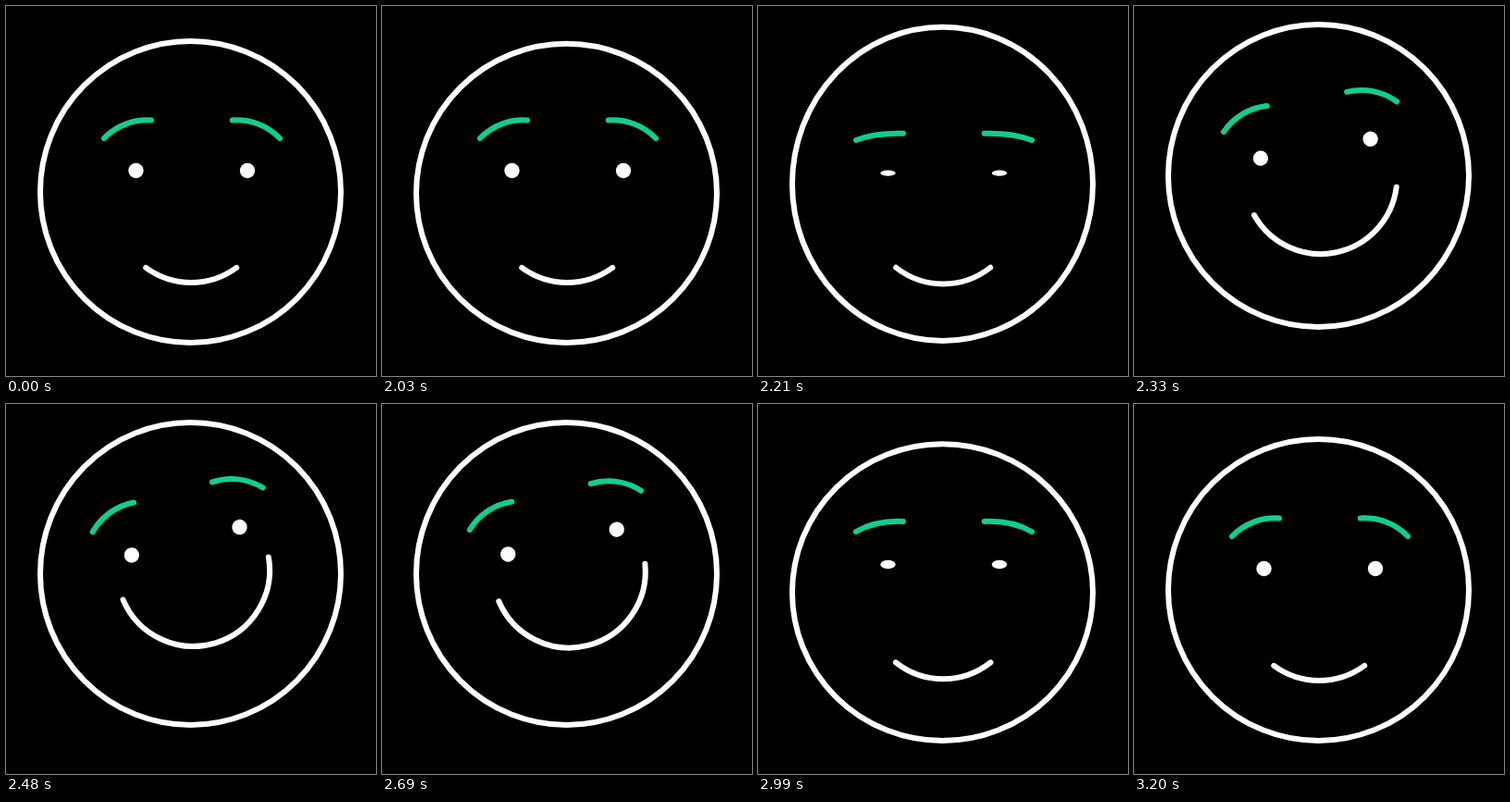
An HTML page for the animation above (3.83 s loop, 400 by 400 pixels).

```html
<!DOCTYPE html>
<html lang="en">
<head>
<meta charset="utf-8">
<title>Smiling face</title>
<style>
  html, body { margin: 0; width: 100%; height: 100%; overflow: hidden; background: #000; }
  svg { display: block; width: 100%; height: 100%; }
  .line { fill: none; stroke: #fff; stroke-width: 6; stroke-linecap: round; }
  .brow { stroke: #12ce8e; }
  .eye { fill: #fff; }
</style>
</head>
<body>
<svg viewBox="0 0 400 400">
  <ellipse id="head" class="line" cx="199.5" rx="162.5"/>
  <path id="mouth" class="line"/>
  <g id="face">
    <path id="browL" class="line brow"/>
    <path id="browR" class="line brow"/>
    <ellipse id="eyeL" class="eye" cx="140.5" rx="8.2"/>
    <ellipse id="eyeR" class="eye" cx="261" rx="8.2"/>
  </g>
</svg>
<script>
const LOOP = 3830, START = 2030, STEP = 30;
const $ = id => document.getElementById(id);

const ramp = (t, a, b) => Math.min(1, Math.max(0, (t - a) / (b - a)));
const smooth = (t, a, b) => {
  const u = ramp(t, a, b);
  return u * u * (3 - 2 * u);
};
// Soft hump of height 1 around a moment.
const bump = (t, mid, width) => Math.cos(Math.PI / 2 * ramp(Math.abs(t - mid), 0, width)) ** 2;
// Fast rise that settles, then an eased return to zero.
const pose = (t, power, from, to) =>
  (1 - (1 - ramp(t, 2210, 2490)) ** power) * (1 - smooth(t, from, to));

function set(id, attrs) {
  for (const k in attrs) $(id).setAttribute(k, attrs[k]);
}

function arc(cx, cy, r, from, to) {
  const at = deg => {
    const a = deg * Math.PI / 180;
    return `${cx + r * Math.cos(a)} ${cy + r * Math.sin(a)}`;
  };
  return `M${at(from)}A${r} ${r} 0 ${from - to > 180 ? 1 : 0} 0 ${at(to)}`;
}

function brow(outer, inner, open, sweep) {
  return `M${outer} 143A65 ${65 * open} 0 0 ${sweep} ${inner} ${143 - 19.5 * open}`;
}

// The outline crouches, hops up with a stretch, drops and settles.
function drawHead(t) {
  const topHop = smooth(t, 2090, 2250) - smooth(t, 2730, 2940);
  const lowHop = smooth(t, 2180, 2320) - smooth(t, 2690, 2870);
  const crouch = 8 * bump(t, 2090, 100) + 6 * bump(t, 2970, 90);
  const overshoot = 2 * (bump(t, 2265, 60) + bump(t, 2740, 50) + bump(t, 3110, 80));
  const top = 38 - 18 * topHop + crouch - overshoot;
  const low = 364 - 17 * lowHop + 8 * (bump(t, 2110, 80) + bump(t, 2900, 90));
  set('head', { cy: (top + low) / 2, ry: (low - top) / 2 });
}

function drawFace(t) {
  const dip = bump(t, 2210, 120);
  const open = 1 - .63 * (dip + bump(t, 2925, 170));
  const angle = -14.6 * pose(t, 2.05, 2610, 2980);
  const lift = 2 * dip - 30.6 * pose(t, 2.8, 2640, 3110);
  set('face', { transform: `translate(0 ${lift}) rotate(${angle} 200.8 204)` });
  set('browL', { d: brow(106, 157, open, 1) });
  set('browR', { d: brow(296, 244.7, open, 0) });
  const eye = { cy: 179 - open, ry: 8.2 * open };
  set('eyeL', eye);
  set('eyeR', eye);

  const mid = 90 + angle * 1.12;
  const half = 36.4 + 1.8 * dip + 47 * pose(t, 2.5, 2640, 3040);
  const y = 216.4 + 1.5 * dip - 37 * pose(t, 3.2, 2640, 3040);
  set('mouth', { d: arc(200.2 - angle * .16, y, 82.5, mid + half, mid - half) });
}

const origin = performance.now();
function tick() {
  const now = (performance.now() - origin) % LOOP;
  const t = now < START ? 0 : START + Math.floor((now - START) / STEP) * STEP;
  drawHead(t);
  drawFace(t);
  requestAnimationFrame(tick);
}
tick();
</script>
</body>
</html>
```
